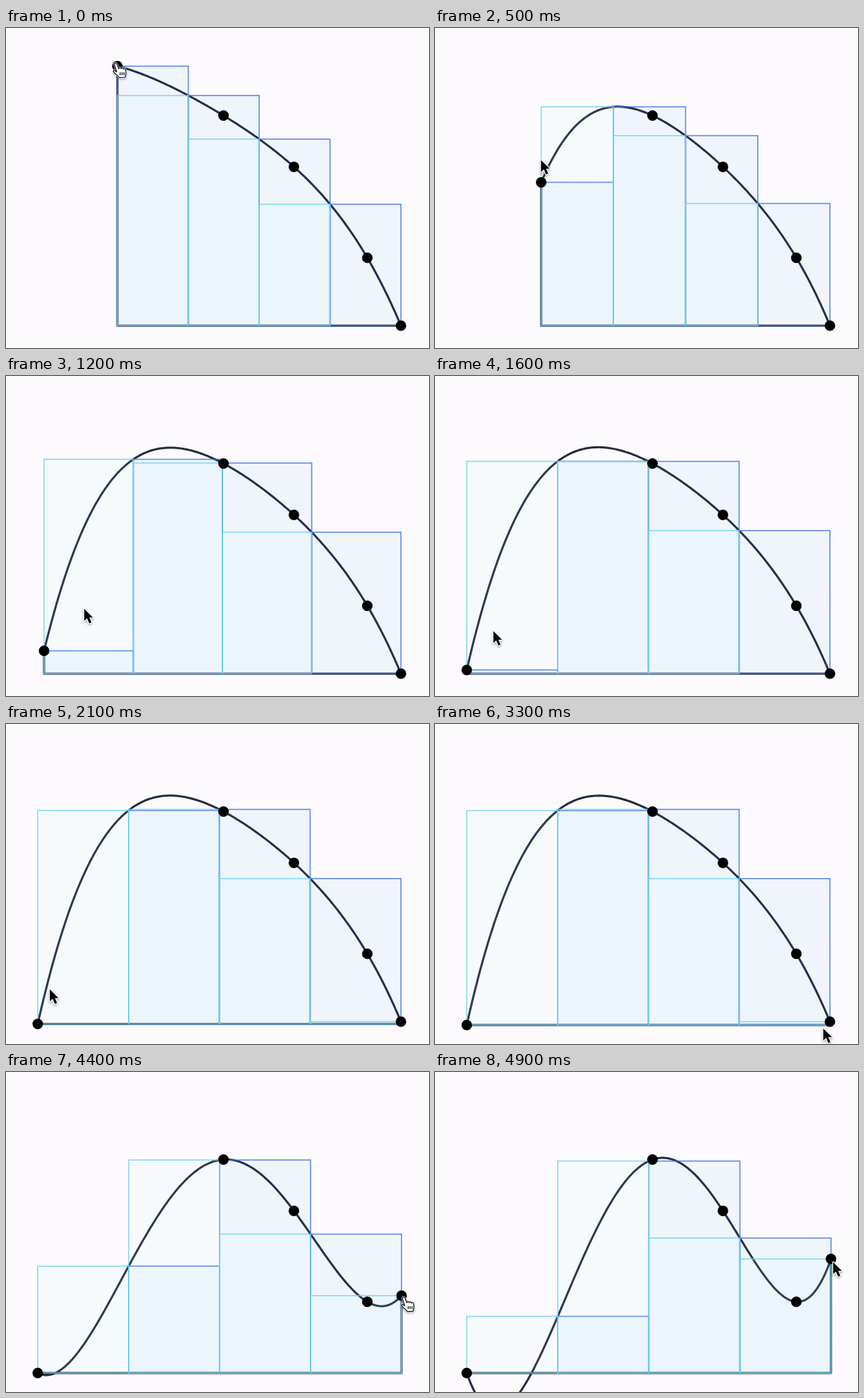
Recreate the animation shown at these times as an HTML page with a canvas. Size 600x455 px, loop 5 s.

```html
<!DOCTYPE html>
<html lang="en">
<head>
<meta charset="utf-8">
<title>Riemann sums</title>
<style>
html, body { margin: 0; width: 100%; height: 100%; overflow: hidden; background: #fcfafd; }
canvas { display: block; }
</style>
</head>
<body>
<canvas width="600" height="455"></canvas>
<script>
const ctx = document.querySelector('canvas').getContext('2d');
const LOOP = 5, FPS = 10, COLUMNS = 4;
const LEFT = { fill: 'rgba(50,150,220,.06)', stroke: 'rgba(60,110,230,.8)' };
const RIGHT = { fill: 'rgba(170,250,255,.07)', stroke: 'rgba(110,212,236,.82)' };
const FIXED = [[308.5, 124.5], [408.4, 197.4], [512.5, 326.7]];

const ARROW = new Path2D('M.5 1.5v17l4-3.6 3.2 7.2 3-1.4-3-6.8h5.2Z');
const HAND = new Path2D('M-1 2C-2-1 1-2 2.5 .5L5 7C5 5 8 5 8.4 7C9 5 11.4 5.5 11.6 7.5' +
  'C12.5 6 14.5 7 14.7 9L15.2 13C15 16 14 17 14 19L6 19.5C4 17 1 15-1.5 12.5C-4 10-2 8.5 0 10L2 11.5Z');
const FINGERS = new Path2D('M7 12v4M9.7 12v4M12.3 12v4');

const lerp = (a, b, p) => a + (b - a) * p;
const progress = (t, from, to) => Math.min(1, Math.max(0, (t - from) / (to - from)));

// Slow start, then an exponential approach to the goal
const settle = (from, to, span, power, t) =>
  lerp(to, from, Math.exp(-((t / span) ** power)));

const startPoint = t => [settle(158, 45, .959, 4.14, t), settle(54.3, 428, .705, 1.57, t)];

function endPoint(t) {
  const p = progress(t, 3.8, 4.9);
  return [lerp(560.2, 561.7, p), lerp(265.8, 423.3, (1 - p) ** 1.4)];
}

function pointer(t) {
  const from = [settle(155, 55.5, 1.45, 2.76, t), settle(51, 381, .78, 1.44, t)];
  const [endX, endY] = endPoint(t);
  const sweep = progress(t, 2.5, 3.1), approach = progress(t, 3.1, 3.7);
  const to = [lerp(544, endX + 2.5, approach), lerp(434, endY + 3, approach)];
  return from.map((v, i) => lerp(v, to[i], sweep));
}

// Lagrange polynomial through all points
function interpolate(points, x) {
  return points.reduce((sum, [xi, yi]) => sum + points.reduce(
    (term, [xj]) => xj === xi ? term : term * (x - xj) / (xi - xj), yi), 0);
}

function column({ fill, stroke }, x, width, top, base) {
  if (Math.abs(base - top) < .3) return;
  ctx.fillStyle = fill;
  ctx.strokeStyle = stroke;
  ctx.lineWidth = 1.6;
  ctx.fillRect(x, top, width, base - top);
  ctx.strokeRect(x, top, width, base - top);
}

function drawPointer(t) {
  const isHand = t < .1 || (t >= 3.5 && t < 4.5);
  const shape = isHand ? HAND : ARROW;
  ctx.save();
  ctx.translate(...pointer(t));
  ctx.lineJoin = 'round';
  ctx.save();
  ctx.shadowColor = 'rgba(0,0,0,.35)';
  ctx.shadowBlur = 3;
  ctx.shadowOffsetY = 1.5;
  ctx.strokeStyle = '#fff';
  ctx.lineWidth = 2.4;
  ctx.stroke(shape);
  ctx.restore();
  ctx.fillStyle = isHand ? '#fff' : '#000';
  ctx.fill(shape);
  if (isHand) {
    ctx.strokeStyle = '#000';
    ctx.lineWidth = 1.2;
    ctx.stroke(HAND);
    ctx.stroke(FINGERS);
  }
  ctx.restore();
}

function draw(t) {
  const points = [startPoint(t), ...FIXED, endPoint(t)];
  const [a, ya] = points[0], [b, yb] = points.at(-1);
  const base = Math.max(ya, yb);
  const width = (b - a) / COLUMNS;

  ctx.fillStyle = '#fcfafd';
  ctx.fillRect(0, 0, 600, 455);

  // Curve, closed along the baseline
  ctx.beginPath();
  for (let i = 0; i <= 200; i++) {
    const x = lerp(a, b, i / 200);
    ctx.lineTo(x, interpolate(points, x));
  }
  ctx.lineTo(b, base);
  ctx.lineTo(a, base);
  ctx.closePath();
  ctx.strokeStyle = '#232b40';
  ctx.lineWidth = 3;
  ctx.lineJoin = 'round';
  ctx.stroke();
  ctx.lineJoin = 'miter';

  [LEFT, RIGHT].forEach((style, side) => {
    for (let i = 0; i < COLUMNS; i++) {
      const top = interpolate(points, a + width * (i + side));
      column(style, a + width * i, width, top, base);
    }
  });

  ctx.fillStyle = '#000';
  for (const [x, y] of points) {
    ctx.beginPath();
    ctx.arc(x, y, 7.5, 0, Math.PI * 2);
    ctx.fill();
  }
  drawPointer(t);
}

function tick() {
  const t = performance.now() / 1000 % LOOP;
  draw(Math.floor(t * FPS) / FPS);
  requestAnimationFrame(tick);
}
tick();
</script>
</body>
</html>
```
